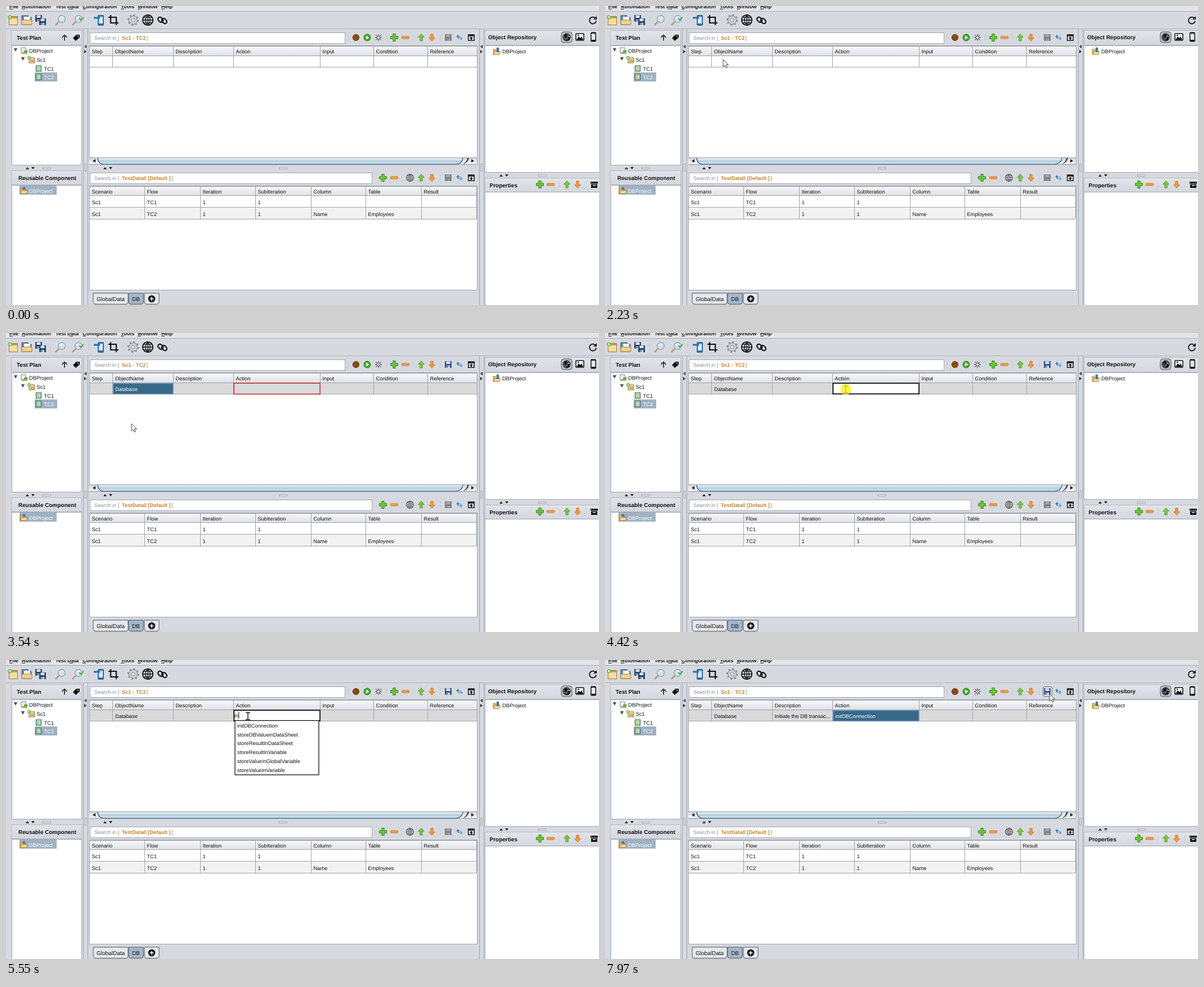
Animation of 1054x531 px, one loop 8 s. Source, as an HTML page:

```html
<!DOCTYPE html>
<html lang="en">
<head>
<meta charset="utf-8">
<title>Test step editor</title>
<style>
html, body { margin: 0; width: 100%; height: 100%; overflow: hidden; background: #d6d9df; }
svg { display: block; width: 1054px; height: 531px; }
text { font: 9.3px "Liberation Sans", Arial, sans-serif; text-rendering: geometricPrecision; white-space: pre; }
.b { font-weight: bold; }
.t { font-weight: bold; font-size: 10px; }
</style>
</head>
<body>
<svg id="stage" viewBox="0 0 1054 531"></svg>
<script>
const $ = id => document.getElementById(id);
const rect = (x, y, w, h, fill, more = '') => `<rect x="${x}" y="${y}" width="${w}" height="${h}" fill="${fill}" ${more}/>`;
const path = (d, fill = 'none', more = '') => `<path d="${d}" fill="${fill}" ${more}/>`;
const line = (d, color = '#9da1a8', w = 1, more = '') => path(d, 'none', `stroke="${color}" stroke-width="${w}" ${more}`);
const disc = (x, y, r, fill, more = '') => `<circle cx="${x}" cy="${y}" r="${r}" fill="${fill}" ${more}/>`;
const text = (x, y, s, fill = '#111', more = '') => `<text x="${x}" y="${y}" fill="${fill}" ${more}>${s}</text>`;
const at = (x, y, s, more = '') => `<g transform="translate(${x} ${y})" ${more}>${s}</g>`;
const grad = (id, ...stops) => `<linearGradient id="${id}" x2="0" y2="1">` +
  stops.map((c, i) => `<stop offset="${i / (stops.length - 1)}" stop-color="${c}"/>`).join('') + '</linearGradient>';
const box = (x, y, w, h, fill = '#fff') => rect(x + .5, y + .5, w, h, fill, 'stroke="#a3a7ae"');

// Icons, each centred on 0,0
const arrow = 'M0-6.5L5.5-.5H2.2V6H-2.2V-.5H-5.5Z';
const floppy = label => path('M-6-6H6V6H-5L-6 5Z', 'currentColor') + rect(-3.5, -5.5, 7, 4.5, label) + rect(-3, 2, 6, 4, label) + rect(-2, 2.5, 1.8, 3, 'currentColor');
const icon = {
  plus: path('M-2.2-6.5h4.4v4.3h4.3v4.4h-4.3v4.3h-4.4v-4.3h-4.3v-4.4h4.3z', '#6cc53a', 'stroke="#37891b"'),
  minus: rect(-6.5, -2, 13, 4, '#f5a04a', 'rx="1" stroke="#cf7420"'),
  up: path(arrow, '#79c843', 'stroke="#429221" stroke-width=".8"'),
  down: path(arrow, '#f39a3d', 'stroke="#c86c1a" stroke-width=".8" transform="rotate(180)"'),
  sep: line('M0-5V6', '#a4a8b0', 1, 'stroke-dasharray="1 2"'),
  globe: disc(0, 0, 6.3, 'none', 'stroke="currentColor" stroke-width="1.3"') +
    line('M-6 0H6M0-6V6M-5-3.3H5M-5 3.3H5M0-6Q-6 0 0 6Q6 0 0-6', 'currentColor', .9),
  save: floppy('#dfe5ee'),
  saveOff: floppy('#a2a5aa'),
  sync: path('M-6-1L-2.5-5L0-1H-1.6Q-1.5 1 0 2.5Q-4 2-4.2-1Z', '#3f7fbd') +
    path('M6 1L2.5 5L0 1H1.6Q1.5-1 0-2.5Q4-2 4.2 1Z', '#6aa5da'),
  out: rect(-5.3, -4.8, 10.6, 10, 'none', 'stroke="#111" stroke-width="1.4"') + rect(-5.5, -5.3, 11, 3, '#111') +
    path('M0-1.5L3 1.5H1V4H-1V1.5H-3Z', '#111'),
  bug: line('M-5-5L5 5M5-5L-5 5M-6 0H6M0-6V6', '#3a4247', 1) + disc(0, 0, 3, '#d3dbc9', 'stroke="#333" stroke-width=".8"'),
  play: disc(0, 0, 6, '#45ad2f', 'stroke="#237d17"') + path('M-2-3.3L3.6 0L-2 3.3Z', '#fff'),
  record: disc(0, 0, 5.6, '#8b4a0b', 'stroke="#6d3808"'),
  sheet: rect(-4.5, -5, 9, 10, '#fdfbe0', 'stroke="#2f6f5c" stroke-width="1.2"') + line('M-4-2.5H4M-4 .3H4M-4 3H4', '#4b9a80') + line('M-1.5-5V5', '#d0b63f'),
  folder: path('M-6-4h4l1 2h6v7h-11z', '#e6b566', 'stroke="#a97822" stroke-width=".8"') + path('M-5 5l2-5h10l-2 5z', '#f8dfa4', 'stroke="#a97822" stroke-width=".8"'),
  lens: line('M-3 3L-9 9', '#b39a76', 2.6) + disc(2, -2, 6.3, '#cfe2f2', 'stroke="#8fa6bb" stroke-width="1.4"') + line('M-1-3Q1-6 4-5', '#fff', 1.4),
  tri: path('M-3.3-3H3.3L0 3Z', '#4a5058'),
};
const put = (...list) => list.map(([name, x, y, color]) => at(x, y, icon[name], color ? `color="${color}"` : '')).join('');

const menu = () => [['File', 6, 0], ['Automation', 28, 0], ['Test Data', 88, 25], ['Configuration', 136, 0], ['Tools', 204, 0], ['Window', 234, 0], ['Help', 276, 0]]
  .map(([s, x, u]) => text(x, 3.7, s, '#111', 'class="b"') + line(`M${x + u} 5.5h6`, '#222')).join('');

const toolbar = () =>
  at(12, 25, rect(-6.5, -6.5, 15, 15, '#f6dfa5', 'stroke="#9d7a35"') + rect(-6, -6, 14, 3, '#c89a4f') + disc(-5, -5, 3.6, '#5ebc3a') + line('M-7-5h4M-5-7v4', '#fff', 1.4)) +
  at(37, 25, path('M-9-8H2l2 3h4V8H-9z', '#5e89ad', 'stroke="#365d7f"') + rect(-5, -6, 11, 8, '#f4f7fa') + path('M-9 8V0H9V8z', '#f0d28f', 'stroke="#a98133"')) +
  at(58, 22, icon.save, 'color="#294a74"') + at(65, 28, icon.save, 'color="#22416b"') +
  put(['sep', 79, 25], ['lens', 97, 25], ['lens', 127, 25], ['sep', 147, 25], ['sep', 208, 25]) +
  line('M130 22l3 3l5-5', '#4eaa2d', 2) +
  at(166, 25, rect(-3, -9, 11, 19, '#2d6da5', 'rx="2"') + rect(-1, -6, 7, 12, '#dcebf7') + path('M-10-5.5H-3V-8L2-4L-3 0V-2.5H-10Z', '#2d6da5')) +
  at(191, 25, line('M-5-9V5H9M-9-5H5V9', '#111', 2.2)) +
  at(226, 25, disc(0, 0, 7.5, '#cfd1d4', 'stroke="#7c7f83"') + disc(0, 0, 9, 'none', 'stroke="#85888c" stroke-width="2.4" stroke-dasharray="3 4.07"') + disc(0, 0, 3.2, '#e6e8ea', 'stroke="#7c7f83"')) +
  at(252, 25, `<g transform="scale(1.45)">${icon.globe}</g>`, 'color="#111"') +
  at(278, 25, rect(-8, -4, 10, 7, 'none', 'rx="3.5" stroke="#111" stroke-width="2.2" transform="rotate(45 -3 -1)"') +
    rect(-2, -2, 10, 7, 'none', 'rx="3.5" stroke="#111" stroke-width="2.2" transform="rotate(45 3 2)"')) +
  at(1043, 25, line('M4.5-3.5A6 6 0 1 0 6 1.5', '#111', 1.8) + path('M7-7V-1H1Z', '#111'));

const hSplit = (a, grip, y) => path(`M${a - 3} ${y + 2}l3-4l3 4zM${a + 7} ${y - 2}l3 4l3-4z`, '#222') + rect(grip + .5, y - 1, 14, 2.5, '#eef0f3', 'stroke="#8c919a" stroke-width=".8"');
const vSplit = x => line(`M${x - 3.5} 41V531M${x + 4.5} 41V531`, '#9ea3ad') + path(`M${x + 2} 69l-4 3l4 3zM${x - 2} 78l4 3l-4 3z`, '#222') +
  rect(x - 1, 280.5, 2.5, 13, '#eef0f3', 'stroke="#8c919a" stroke-width=".8"');
const head = (x, y, w, h) => rect(x + .5, y + .5, w, h, 'url(#panel)', 'stroke="#b5b9c1"');

function grid(cols, top, names, rows) {
  const y0 = top + .5, end = cols[cols.length - 1], low = rows[rows.length - 1];
  return rect(cols[0], top, end - cols[0], rows[0] - top, 'url(#header)') +
    line(`M${cols[0]} ${y0}H${end}`) + rows.map(y => line(`M${cols[0]} ${y + .5}H${end}`)).join('') +
    cols.map(x => line(`M${x + .5} ${top}V${low}`)).join('') +
    names.map((s, i) => text(cols[i] + 4.5, top + 12.5, s)).join('');
}

const cols = [148, 189, 297, 404, 558, 653, 749, 837];
const dataCols = [148, 246, 345, 443, 542, 639, 738, 836];
const dataRows = [['Sc1', 'TC1', '1', '1'], ['Sc1', 'TC2', '1', '1', 'Name', 'Employees']];

const left = () =>
  head(9, 43, 125, 26) + text(19, 60, 'Test Plan', '#111', 'class="t"') +
  line('M104 61.5V52M99.5 56L104 51.5L108.5 56', '#111', 1.5) +
  path('M119 57L125 51H131V56L124 62Z', '#111') + disc(128, 53.5, 1, '#fff') +
  box(10, 70, 124, 212) + put(['tri', 17, 78], ['tri', 30, 94]) +
  at(32, 79, rect(-5, -5, 8, 9, '#eef3f8', 'stroke="#6a8aa6"') + rect(-4, 3, 10, 3, '#b9a063') + path('M0 0h4v-2l3 3.5l-3 3.5v-2h-4z', '#53b03a')) +
  at(45, 95, rect(-4, -3, 10, 9, '#f3e0a5', 'stroke="#8f6b2a"') + line('M-2 1H5M-2 3.5H5', '#b25c3a') + disc(-4, -3, 3, '#4fae35') + line('M-6-3h4M-4-5v4', '#fff')) +
  rect(51, 118, 40, 16, '#9fb2c4') + put(['sheet', 58, 111], ['sheet', 58, 126]) +
  text(41, 83, 'DBProject') + text(54.5, 99, 'Sc1') + text(67.5, 115, 'TC1') + text(67.5, 130, 'TC2', '#fff') +
  hSplit(38, 65, 288) + head(9, 292, 125, 25) + text(22, 309, 'Reusable Component', '#111', 'class="t"') +
  box(10, 318, 124, 214) + rect(24, 319, 66, 16, '#9fb2c4') + put(['folder', 31, 328]) + disc(32, 324, 2.5, '#3d78ae') + text(41, 332, 'DBProject', '#fff');

const search = (y, w, s) => box(149, y, w, 19) + text(157, y + 13.3, 'Search in [', '#8a8d92') +
  text(206, y + 13.3, s, '#c9812a', 'class="b"');

const steps = () =>
  search(47, 453, 'Sc1 - TC2') + text(249.5, 60.3, ']', '#8a8d92') +
  put(['sep', 608, 56], ['record', 622, 56], ['play', 642, 56], ['bug', 662, 56], ['sep', 676, 56], ['plus', 690, 56], ['minus', 710, 56], ['sep', 724, 56],
    ['up', 738, 56], ['down', 757, 56], ['sep', 772, 56], ['saveOff', 786, 56, '#7f8288'], ['sync', 806, 56], ['out', 827, 56]) +
  rect(778.5, 47.5, 16, 17, '#eceff4', 'id="hover" rx="3" stroke="#59636f"') + at(786, 56, icon.save, 'id="save" color="#35588f"') +
  box(148, 70, 689, 211) + rect(148, 89, 689, 20, '#dadada', 'id="row"') + grid(cols, 71, ['Step', 'ObjectName', 'Description', 'Action', 'Input', 'Condition', 'Reference'], [88, 108]) +
  rect(190.5, 89.5, 106, 19, '#39698a', 'id="sel" stroke="#7c9bc0" stroke-width="1.4"') +
  rect(405.2, 89, 153, 19.5, 'none', 'id="red" stroke="#c4302b" stroke-width="1.6"') +
  text(194, 103, 'Database', '#111', 'id="name"') + text(301.5, 103, 'Initiate the DB transac...', '#111', 'id="desc"') + text(409, 103, 'initDBConnection', '#fff', 'id="act"') +
  `<g id="editor">${rect(0, 89.2, 10, 19, '#fff', 'id="field" stroke="#111" stroke-width="1.8"')}${text(406, 102, '', '#111', 'id="typed"')}${rect(0, 92, 1, 12, '#111', 'id="caret"')}</g>` +
  rect(148, 269, 689, 12, 'url(#track)') + line('M148 269.5H837M148 281.5H837', '#8e949d') +
  path('M163 270Q164 281 174 281H800Q811 280 812 270Z', 'url(#thumb)') + line('M163 270Q164 281 174 281H800Q811 280 812 270', '#35516a', 1.2) +
  path('M823 270Q821 279 812 281Q819 277 820 270Z', '#444b54') + path('M159 272v6l-5-3zM827 272v6l5-3z', '#111');

const data = () =>
  hSplit(176, 485, 288) + search(296, 501, 'TestData0 [Default ]') + text(294, 309.3, ']', '#8a8d92') +
  put(['plus', 670, 305], ['minus', 690, 305], ['sep', 704, 305], ['globe', 718, 305, '#555'], ['up', 738, 305], ['down', 757, 305], ['sep', 772, 305],
    ['saveOff', 786, 305, '#7f8288'], ['sync', 806, 305], ['out', 827, 305]) +
  box(148, 319, 689, 185) + rect(148, 358, 688, 20, '#f2f2f2') +
  grid(dataCols, 320, ['Scenario', 'Flow', 'Iteration', 'SubIteration', 'Column', 'Table', 'Result'], [336, 357, 378]) +
  dataRows.map((r, j) => r.map((s, i) => text(dataCols[i] + 4.5, 352 + j * 21, s)).join('')).join('') +
  [[155, 62, '#e6e8ec'], [218, 26, '#a5b8cb'], [246, 26, '#e6e8ec']].map(([x, w, c]) => path(`M${x} 510V526Q${x} 529.5 ${x + 4} 529.5H${x + w - 4}Q${x + w} 529.5 ${x + w} 526V510Z`, c, 'stroke="#4d5562"')).join('') +
  text(161, 524, 'GlobalData', '#111', 'style="font-size:10px"') + text(224, 524, 'DB', '#111', 'style="font-size:10px"') +
  disc(259, 520, 6.3, '#111') + line('M255.5 520h7M259 516.5v7', '#fff', 1.6);

const right = () =>
  head(851, 43, 210, 26) + text(857, 59, 'Object Repository', '#111', 'class="t"') +
  rect(987, 46, 19, 19, '#b9bec7', 'rx="4" stroke="#555b65"') + put(['globe', 996.5, 55.5, '#111']) + path('M992 52l4-2l2 4l-3 2l-2 4zM998 56l4-1l-1 5l-3 1z', '#111') +
  at(1020, 55, rect(-7, -6, 14, 12, '#fff', 'rx="1" stroke="#111" stroke-width="1.6"') + path('M-6 5L-2-1L1 2L3-1L6 5Z', '#111') + disc(-3, -3, 1.2, '#111')) +
  at(1044, 55, rect(-5, -8.5, 10, 17, '#111', 'rx="2"') + rect(-3.5, -6, 7, 11, '#e6e8ec')) +
  box(851, 70, 210, 225) + put(['folder', 872, 81]) + disc(874, 76, 2.5, '#3d78ae') + rect(872, 78, 4, 4, '#3d78ae') + text(882, 84, 'DBProject') +
  hSplit(880, 946, 301) + head(851, 305, 210, 25) + text(859.5, 321.5, 'Properties', '#111', 'class="t"') +
  put(['plus', 949, 317], ['minus', 968, 317], ['sep', 983, 317], ['up', 997, 317], ['down', 1016, 317], ['sep', 1031, 317]) +
  rect(1039, 312, 13, 3.5, '#111') + rect(1040, 316.5, 11, 6.5, '#111') + rect(1043, 318, 5, 1.4, '#fff') +
  box(851, 330, 210, 204);

$('stage').innerHTML =
  `<defs>${grad('panel', '#e1e4e9', '#d3d6dc')}${grad('header', '#f8f8fa', '#dfe2e7')}${grad('track', '#d3d6dc', '#f1f2f4')}${grad('thumb', '#eef5fa', '#b4cee0', '#d5ebf7')}</defs>` +
  rect(0, 0, 1054, 531, '#d6d9df') + rect(0, 0, 1054, 9, '#e2e4e9') + line('M0 9.5H1054', '#a9adb6') + line('M0 40.5H1054', '#b2b6be') +
  menu() + toolbar() + vSplit(141) + vSplit(845) + left() + steps() + data() + right() +
  `<g id="popup"></g>` +
  path('M0 0V13L3 10.2L5.2 15L7.4 14L5.2 9.4H9.3Z', '#fff', 'id="arrow" stroke="#333" stroke-width=".9"') +
  `<g id="beam">${line('M-4-6H-1L0-5L1-6H4M-4 6.5H-1L0 5.5L1 6.5H4M0-5V6', '#111', 1.4)}</g>` +
  disc(0, 0, 9.8, '#fff01a', 'id="click" opacity=".75"');

const objects = ['Execute', 'App', 'Browser', 'Database', 'Webservice'];
const actions = ['assertDBResult', 'closeDBConnection', 'executeDMLQuery', 'executeSelectQuery', 'initDBConnection', 'storeDBValueinDataSheet', 'storeResultInDataSheet',
  'storeResultInVariable', 'storeValueInGlobalVariable', 'storeValueInVariable', 'verifyDBResult'];
const matching = s => actions.filter(a => a.toLowerCase().includes(s)).slice(0, 8);

// What changes when; each entry adds to the state before it
const script = [
  [0, { shape: '', typed: '', list: [], hot: -1 }],
  [1190, { shape: 'arrow' }],
  [2360, { click: 1 }],
  [2430, { click: 0, row: 1, sel: 1 }],
  [2500, { click: 1 }],
  [2570, { click: 0, sel: 0, edit: 1, shape: 'beam' }],
  [2640, { list: objects }],
  [2840, { shape: 'arrow' }],
  [3390, { click: 1 }],
  [3540, { click: 0, edit: 0, list: [], sel: 1, name: 1, red: 1, save: 1 }],
  [4220, { click: 1 }],
  [4290, { sel: 3, red: 0 }],
  [4420, { sel: 0, edit: 3, shape: 'beam' }],
  [4490, { click: 0, caret: 1 }],
  [4550, { list: matching('') }],
  [4950, { caret: 0 }],
  [5280, { typed: 'i', caret: 1, list: matching('i') }],
  [5550, { typed: 'in', list: matching('in') }],
  [5680, { typed: 'ini', list: matching('ini') }],
  [6160, { hot: 0, caret: 0 }],
  [6290, { shape: 'arrow' }],
  [6690, { caret: 1 }],
  [6760, { edit: 0, list: [], sel: 3, done: 1 }],
  [7900, { hover: 1 }],
];

// Pointer moves: start, end, steps, from x, y, to x, y
const moves = [
  [1190, 1960, 11, 1031, 516, 186, 100],
  [2020, 2230, 3, 186, 100, 210, 95],
  [2770, 3250, 7, 210, 95, 223, 161],
  [3540, 4080, 8, 223, 161, 428, 100],
  [4480, 4490, 1, 428, 100, 430, 99.5],
  [7350, 7765, 6, 430, 99, 847, 70],
  [7765, 7970, 3, 847, 70, 790, 60],
];

function pointer(t) {
  const [a, b, n, x0, y0, x1, y1] = moves.filter(m => m[0] <= t).pop() || moves[0];
  const k = Math.max(0, Math.min(1, Math.floor((t - a) / (b - a) * n + .02) / n));
  const e = k * k * (3 - 2 * k);
  return [x0 + (x1 - x0) * e, y0 + (y1 - y0) * e];
}

const show = (id, on) => $(id).setAttribute('visibility', on ? 'visible' : 'hidden');
const set = (id, attrs) => { for (const k in attrs) $(id).setAttribute(k, attrs[k]); };

function popup(list, hot, col) {
  if (!list.length) return '';
  const x = cols[col] + 3, w = cols[col + 1] - cols[col] - 5, h = 15.7;
  return rect(x, 107.5, w, list.length * h + 2.2, '#fff', 'stroke="#111" stroke-width="1.3"') +
    list.map((s, i) => (i === hot ? rect(x + .6, 108 + i * h, w - 1.2, h, '#39698a') : '') +
      text(x + 4, 120 + i * h, s, i === hot ? '#fff' : '#111')).join('');
}

let drawn = '';
function draw(t) {
  const s = Object.assign({}, ...script.filter(e => e[0] <= t).map(e => e[1]));
  const [x, y] = pointer(t);
  const hot = s.edit === 1 ? Math.floor((y - 108) / 15.7) : s.hot;
  const place = `translate(${x.toFixed(1)} ${y.toFixed(1)})`;
  for (const id of ['arrow', 'beam', 'click']) set(id, { transform: place });
  show('arrow', s.shape === 'arrow');
  show('beam', s.shape === 'beam');
  for (const id of ['click', 'row', 'red', 'hover', 'name', 'save', 'sel', 'editor']) show(id, s[id]);
  show('row', s.row);
  show('desc', s.done);
  show('act', s.done);
  show('editor', s.edit);
  if (s.sel) set('sel', { x: cols[s.sel] + 1.5, width: cols[s.sel + 1] - cols[s.sel] - 1.5 });
  set('name', { fill: s.sel === 1 ? '#fff' : '#111' });
  if (s.edit) set('field', { x: cols[s.edit] + 1.3, width: cols[s.edit + 1] - cols[s.edit] - 1.2 });
  $('typed').textContent = s.edit ? s.typed : '';
  show('caret', s.edit && s.caret);
  set('caret', { x: 406 + (s.typed ? $('typed').getComputedTextLength() : 0) });
  const key = s.list.join() + hot;
  if (key !== drawn) {
    $('popup').innerHTML = popup(s.list, hot, s.edit);
    drawn = key;
  }
}

const start = performance.now();
function tick() {
  draw((performance.now() - start) % 8000);
  requestAnimationFrame(tick);
}
tick();
</script>
</body>
</html>
```
